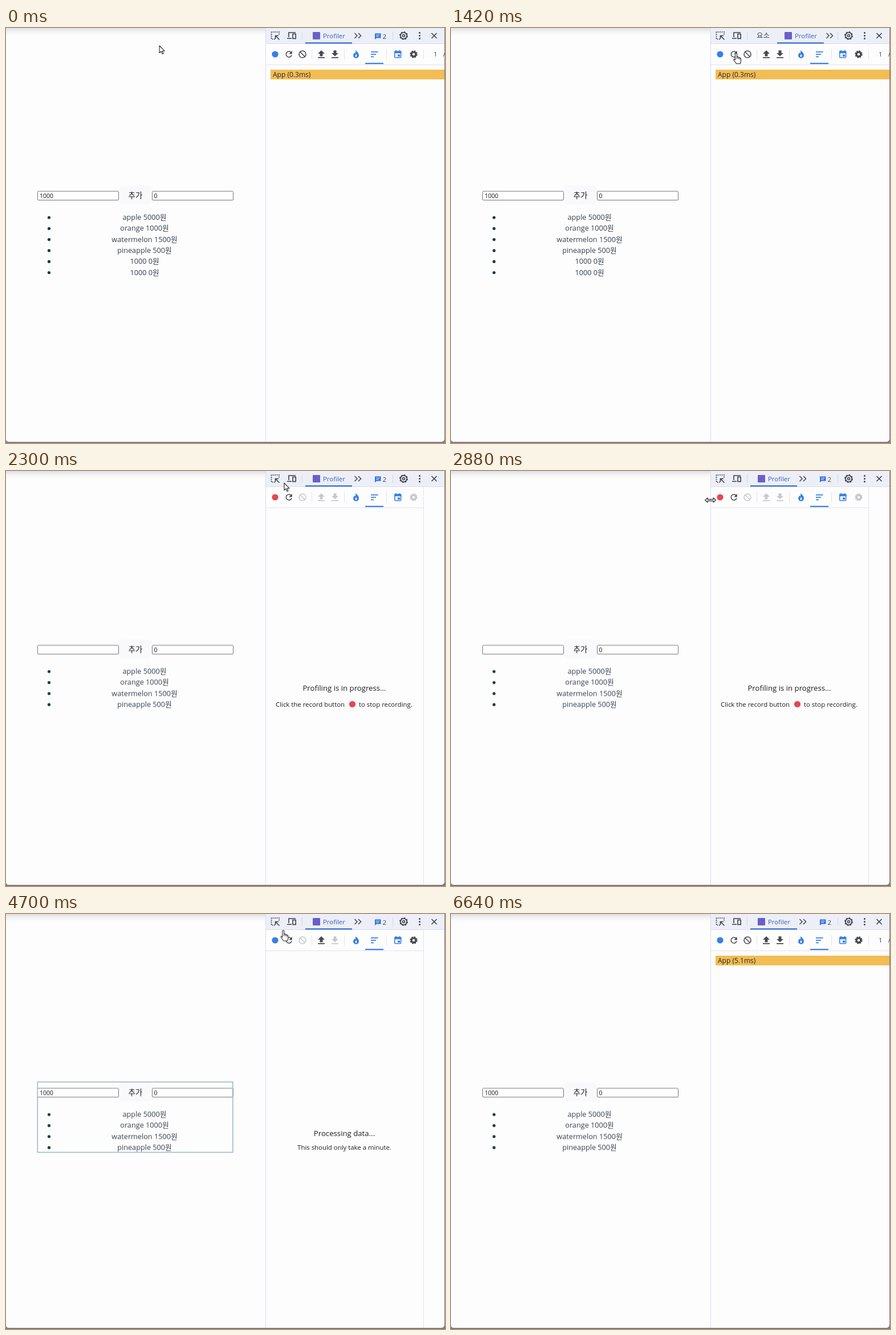
These frames come from a looping animation (770 px wide and 727 px high, 6670 ms). An HTML page:

```html
<!DOCTYPE html>
<html lang="ko">
<head>
<meta charset="utf-8">
<title>Profiler</title>
<style>
html, body { margin: 0; width: 100%; height: 100%; overflow: hidden; background: #fefdfe; }
svg { display: block; width: 770px; height: 727px; font-family: "Open Sans", "Noto Sans CJK KR", "Noto Sans CJK", sans-serif; }
.mid { text-anchor: middle; }
.list { font-size: 12.7px; fill: #33414f; }
.field { font-size: 10.5px; fill: #111; }
.box { fill: #fff; stroke: #767676; }
.sep { stroke: #dfe3ec; }
.on { color: #474a50; }
.off { color: #c6c8cc; }
.blue { color: #3580e6; }
.dark { color: #3c4046; }
.line { fill: none; stroke: currentColor; stroke-width: 1.6; }
.solid { fill: currentColor; }

.anim { animation: 6670ms step-end infinite; }
.first { animation-name: first; }
.record { animation-name: record; }
.process { animation-name: process; }
.last { animation-name: last; }
.added { animation-name: added; }
.typed { animation-name: typed; }
.form { animation-name: form; }
.narrow { animation-name: narrow; }
.wide { animation-name: wide; }
.flash { animation-name: flash; animation-timing-function: linear; }
.cursor { animation-name: move; animation-timing-function: linear; }
.arrow { animation-name: arrow; }
.hand { animation-name: hand; }
.resize { animation-name: resize; }

@keyframes first { 0% { opacity: 1 } 29.5%, 100% { opacity: 0 } }
@keyframes record { 0% { opacity: 0 } 29.5% { opacity: 1 } 65.3%, 100% { opacity: 0 } }
@keyframes process { 0% { opacity: 0 } 65.3% { opacity: 1 } 88.58%, 100% { opacity: 0 } }
@keyframes last { 0% { opacity: 0 } 88.58%, 100% { opacity: 1 } }
@keyframes added { 0% { opacity: 1 } 23.95%, 100% { opacity: 0 } }
@keyframes typed { 0% { opacity: 1 } 23.95% { opacity: 0 } 65.3%, 100% { opacity: 1 } }
@keyframes form { 0% { transform: none } 23.95%, 100% { transform: translateY(19.3px) } }
@keyframes narrow { 0% { opacity: 1 } 15.4% { opacity: 0 } 28.6%, 100% { opacity: 1 } }
@keyframes wide { 0% { opacity: 0 } 15.4% { opacity: 1 } 28.6%, 100% { opacity: 0 } }
@keyframes flash { 0%, 65.29% { opacity: 0 } 65.3%, 71% { opacity: 1 } 73.1%, 100% { opacity: 0 } }
@keyframes arrow { 0% { opacity: 1 } 8.9% { opacity: 0 } 27% { opacity: 1 } 42.2%, 100% { opacity: 0 } }
@keyframes hand { 0% { opacity: 0 } 8.9% { opacity: 1 } 27% { opacity: 0 } 44.5% { opacity: 1 } 71.8%, 100% { opacity: 0 } }
@keyframes resize { 0% { opacity: 0 } 42.2% { opacity: 1 } 44.5%, 100% { opacity: 0 } }
@keyframes move {
  0% { transform: translate(269px, 31px) }
  1.5% { transform: translate(284px, 28px) }
  4.5% { transform: translate(375px, 56px) }
  6.75% { transform: translate(446px, 66px) }
  9% { transform: translate(489px, 48px) }
  10.04% { transform: translate(498px, 43px) }
  12.3%, 22% { transform: translate(500px, 44px) }
  25.5% { transform: translate(504px, 37px) }
  30% { transform: translate(497px, 25px) }
  34.45% { transform: translate(488px, 21px) }
  38.7% { transform: translate(486px, 33px) }
  40.9% { transform: translate(470px, 46px) }
  43.18% { transform: translate(455px, 51px) }
  45.9% { transform: translate(468px, 50px) }
  48.6%, 49.8% { transform: translate(479px, 42px) }
  51.7%, 55.4% { transform: translate(474px, 43px) }
  55.9%, 69.5% { transform: translate(472px, 46px) }
  70.46% { transform: translate(486px, 29px) }
  71.4% { transform: translate(500px, 6px) }
  71.8%, 100% { transform: translate(508px, -30px) }
}
</style>
</head>
<body>
<svg viewBox="0 0 770 727">
<defs>
  <linearGradient id="shade" x2="0" y2="1">
    <stop stop-color="#dfdfe1"/><stop offset=".5" stop-color="#f4f3f5"/><stop offset="1" stop-color="#fefdfe"/>
  </linearGradient>
  <g id="gear">
    <circle r="3.9" fill="none" stroke="currentColor" stroke-width="3.2"/>
    <circle r="5.8" fill="none" stroke="currentColor" stroke-width="1.8" stroke-dasharray="2.6 1.955"/>
  </g>
  <g id="cog" class="line">
    <circle r="5.5"/><circle r="2"/>
    <circle r="6.6" stroke-dasharray="3 2.18"/>
  </g>
  <g id="clear" class="line"><circle r="6"/><path d="M-4.2-4.2 4.2 4.2"/></g>
  <path id="up" class="solid" d="M0-7 6-1H2.5V3.5h-5V-1H-6zM-6 5H6V6.8H-6z"/>
  <path id="down" class="solid" d="M0 3.5-6-2h3.5v-4.8h5V-2H6zM-6 5H6V6.8H-6z"/>
  <path id="more" class="line" d="M-5.5-4.5-1 0-5.5 4.5M1-4.5 5.5 0 1 4.5"/>
  <g id="tab">
    <rect x="538" y="7" width="13" height="13" rx="1" fill="#6b5fc7"/>
    <text x="556" y="17.5" font-size="11.4" fill="#3f5fb8">Profiler</text>
    <path d="M525 26.2h82" stroke="#2866d2" stroke-width="2"/>
    <use href="#more" x="617" y="13.5" class="on"/>
  </g>
  <g id="chart">
    <g class="on">
      <use href="#clear" x="520" y="46"/><use href="#up" x="553" y="46"/>
      <use href="#down" x="577" y="46"/><use href="#gear" x="715" y="46"/>
    </g>
    <circle cx="472" cy="46" r="5.6" fill="#3580e6"/>
    <path class="sep" d="M732.5 37v18M732 64.5h37"/>
    <text x="750" y="50" font-size="11.4" fill="#30409a">1</text>
    <text x="766.5" y="50" font-size="11.4" fill="#555">/</text>
    <rect x="464" y="73" width="305" height="17" fill="#f2bd53"/>
  </g>
  <path id="side" class="sep" d="M732.5 28V725"/>
</defs>

<rect width="770" height="727" fill="#85777a"/>
<path d="M0 0H769V719q0 6-6 6H5q-5 0-5-5z" fill="#fefdfe"/>
<rect width="455" height="14" fill="url(#shade)"/>

<!-- page -->
<g class="anim form">
  <rect x="198" y="276" width="58" height="33" rx="7" fill="#f9f8fa"/>
  <text class="mid" x="227" y="298" font-size="13.5" fill="#1c1c1c">추가</text>
  <rect class="box" x="55.5" y="286" width="142" height="15.5" rx="1.5"/>
  <rect class="box" x="256.5" y="286" width="142" height="15.5" rx="1.5"/>
  <text class="field anim typed" x="59" y="297.6">1000</text>
  <text class="field" x="259.5" y="297.6">0</text>
  <g class="list mid">
    <text x="243" y="336">apple 5000원</text>
    <text x="243" y="355.3">orange 1000원</text>
    <text x="243" y="374.6">watermelon 1500원</text>
    <text x="243" y="393.9">pineapple 500원</text>
    <g fill="#213547">
      <circle cx="75.5" cy="332" r="2.6"/><circle cx="75.5" cy="351.3" r="2.6"/>
      <circle cx="75.5" cy="370.6" r="2.6"/><circle cx="75.5" cy="389.9" r="2.6"/>
    </g>
    <g class="anim added">
      <text x="243" y="413.2">1000 0원</text>
      <text x="243" y="432.5">1000 0원</text>
      <circle cx="75.5" cy="409.2" r="2.6" fill="#213547"/>
      <circle cx="75.5" cy="428.5" r="2.6" fill="#213547"/>
    </g>
  </g>
</g>
<rect class="anim flash" x="55.3" y="294.3" width="342.5" height="123.2" fill="none" stroke="#97bec6" stroke-width="1.6"/>

<!-- tab bar -->
<rect x="456" width="313" height="27" fill="#eceff7"/>
<path d="M456 27.5H769M455.5 0V725" stroke="#d9deea"/>
<g class="dark">
  <path class="line" d="M472 19.5h-6.5V7H479v6" stroke-dasharray="2 1.5"/>
  <path class="line" d="M479.5 20.5 473 14M472.5 19v-5.5H478"/>
  <path class="line" d="M496 16V8h12M493 18.3h8"/>
  <rect class="line" x="503" y="10.5" width="5.2" height="8"/>
  <use href="#cog" x="697.5" y="13.5"/>
  <g class="solid"><circle cx="725.5" cy="8.5" r="1.5"/><circle cx="725.5" cy="13.5" r="1.5"/><circle cx="725.5" cy="18.5" r="1.5"/></g>
  <path class="line" d="M746.5 9 755.5 18M755.5 9 746.5 18"/>
</g>
<path d="M519.5 6v15M678.5 6v15" stroke="#d3d8e5"/>
<g class="anim narrow">
  <use href="#tab"/>
  <path d="M647 9.5h10.5v8H650L647 20z" fill="#3470dc"/>
  <path d="M649 12.3h6.5M649 14.8h5" stroke="#eceff7"/>
  <text x="660.5" y="19" font-size="11.6" fill="#45484e">2</text>
</g>
<g class="anim wide">
  <text x="536" y="17.5" font-size="12.5" fill="#3c4046">요소</text>
  <use href="#tab" x="47"/>
</g>

<!-- toolbar -->
<path class="sep" d="M456 64.5H732M536.5 37v18M593.5 37v18M667.5 37v18"/>
<g class="on">
  <path class="line" d="M500.2 43A5 5 0 1 0 501 47.5"/>
  <path class="solid" d="M501.8 40v5.6h-5.6z"/>
</g>
<g class="blue">
  <path class="solid" d="M613 39q6 4.500 6 9a5 5 0 0 1-10 0q0-3 2.500-5l.8 2.200q1.500-2.500.7-6.200z"/>
  <path d="M614.3 46q2 2.500.5 4.500h-2q-1-2 1.500-4.500z" fill="#fefdfe"/>
  <path class="solid" d="M640 41h12.500v1.800H640zM640 45.200h9v1.800h-9zM640 49.400h5v1.800h-5z"/>
  <path class="solid" d="M630 61h32v2.200H630z"/>
  <rect class="line" x="681.8" y="41" width="10.8" height="10.700" rx="1"/>
  <path class="solid" d="M681 40.500h12.400v3.700H681zM683 39h2v3h-2zM689.500 39h2v3h-2zM687 46.500h4v3.500h-4z"/>
</g>

<!-- panel states -->
<g class="anim first">
  <use href="#chart"/>
  <text x="468" y="86.300" font-size="12" fill="#282828">App (0.3ms)</text>
</g>
<g class="anim record">
  <g class="off">
    <use href="#clear" x="520" y="46"/><use href="#up" x="553" y="46"/>
    <use href="#down" x="577" y="46"/><use href="#gear" x="715" y="46"/>
  </g>
  <use href="#side"/>
  <g fill="#e6484f"><circle cx="472" cy="46" r="5.600"/><circle cx="607.500" cy="408.500" r="5.600"/></g>
  <g fill="#1d1d1f" font-size="11.400">
    <text class="mid" x="593.500" y="385" font-size="13.200">Profiling is in progress...</text>
    <text x="473" y="413">Click the record button</text>
    <text x="619" y="413">to stop recording.</text>
  </g>
</g>
<g class="anim process">
  <g class="off"><use href="#clear" x="520" y="46"/><use href="#down" x="577" y="46"/></g>
  <g class="on"><use href="#up" x="553" y="46"/><use href="#gear" x="715" y="46"/></g>
  <use href="#side"/>
  <circle cx="472" cy="46" r="5.600" fill="#3580e6"/>
  <g class="mid" fill="#1d1d1f">
    <text x="593.500" y="389" font-size="13.200">Processing data...</text>
    <text x="593.500" y="413" font-size="11.400">This should only take a minute.</text>
  </g>
</g>
<g class="anim last">
  <use href="#chart"/>
  <text x="468" y="86.300" font-size="12" fill="#282828">App (5.1ms)</text>
</g>

<!-- pointer -->
<g class="anim cursor" fill="#fff" stroke="#222" stroke-width="1.100" stroke-linejoin="round">
  <path class="anim arrow" d="M0 0V12.500L3 9.800 5 14.600 7 13.800 5 9.200H9z"/>
  <g class="anim hand">
    <path d="M-1.500 1.500a1.500 1.500 0 0 1 3 0V6.500q2-.5 2.800.8 1.500-.4 2.200.9 2 0 2 2V14q0 2.500-1.500 4.500H.500L-3.800 12.500q-.6-1.600.6-2.200l1.700 1.500z"/>
    <path d="M1.500 6.500V10M4.300 7.500V10.500M6.500 8.500V11" fill="none"/>
  </g>
  <path class="anim resize" d="M-9.300 0-5-4V-1.400H5V-4L9.300 0 5 4V1.400H-5V4z"/>
</g>
</svg>
</body>
</html>
```
